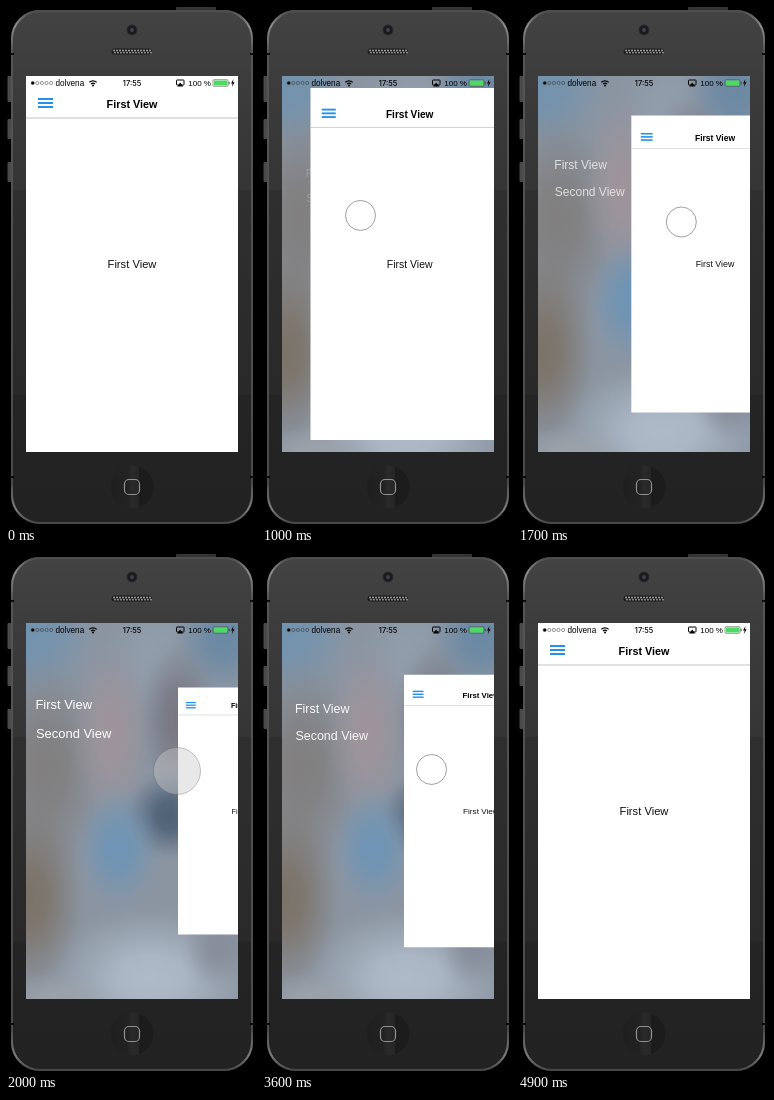
These frames come from a looping animation (250x519 px, 5000 ms). An HTML page with a canvas:

```html
<!DOCTYPE html>
<html>
<head>
<meta charset="utf-8">
<style>
html, body { margin: 0; width: 100%; height: 100%; overflow: hidden; background: #000; }
canvas { display: block; }
</style>
</head>
<body>
<canvas id="stage" width="250" height="519"></canvas>
<script>
const ctx = document.getElementById('stage').getContext('2d');
const LOOP = 5000, STEP = 100;
const SCREEN = { x: 20, y: 70, w: 212, h: 376, cx: 126, cy: 258 };
const OPEN = 156;
const FONT = '"Liberation Sans", Arial, sans-serif';

// [time, value] pairs, joined by straight lines
const panelPath = [[600, 0], [700, 3.5], [900, 19], [1300, 57], [1500, 78], [1800, 101],
  [1900, 134], [2000, 152], [2100, OPEN], [3200, OPEN], [3400, 141.5], [4000, 83],
  [4100, 70], [4200, 38], [4300, 15], [4400, 4], [4500, 0]];
const touches = [
  { down: 400, up: 1800, offset: 70, y: [[600, 206], [1300, 212], [1900, 218]] },
  { down: 2900, up: 4100, offset: 47.5, y: [[3100, 209], [3200, 210], [4000, 223], [4100, 225]] }
];
// Blurred wallpaper: x, y, horizontal radius, vertical radius, colour
const blobs = [
  [25, 80, 70, 70, '112,146,174'], [150, 105, 55, 70, '146,158,172'],
  [218, 85, 55, 60, '104,136,164'], [40, 215, 65, 120, '128,125,124'],
  [105, 180, 45, 95, '160,148,154'], [172, 165, 42, 85, '118,117,127'],
  [165, 262, 50, 48, '72,92,114'], [215, 250, 55, 80, '110,120,135'],
  [112, 295, 45, 65, '108,148,182'], [24, 345, 60, 105, '122,112,100'],
  [145, 425, 110, 75, '178,190,204'], [212, 395, 38, 45, '134,140,154'],
  [50, 450, 60, 35, '158,163,170']
];

function along(points, t) {
  if (t <= points[0][0]) return points[0][1];
  for (let i = 1; i < points.length; i++) {
    const [t0, v0] = points[i - 1], [t1, v1] = points[i];
    if (t < t1) return v0 + (v1 - v0) * (t - t0) / (t1 - t0);
  }
  return points[points.length - 1][1];
}

function gradient(x0, y0, x1, y1, stops) {
  const fill = ctx.createLinearGradient(x0, y0, x1, y1);
  stops.forEach(stop => fill.addColorStop(...stop));
  return fill;
}

function rect(x, y, w, h, fill, radius = 0) {
  ctx.fillStyle = fill;
  ctx.beginPath();
  ctx.roundRect(x, y, w, h, radius);
  ctx.fill();
}

function outline(x, y, w, h, radius, stroke, width = 1) {
  ctx.strokeStyle = stroke;
  ctx.lineWidth = width;
  ctx.beginPath();
  ctx.roundRect(x, y, w, h, radius);
  ctx.stroke();
}

function disc(x, y, r, fill, stroke, width = 1) {
  ctx.beginPath();
  ctx.arc(x, y, r, 0, 7);
  if (fill) { ctx.fillStyle = fill; ctx.fill(); }
  if (stroke) { ctx.strokeStyle = stroke; ctx.lineWidth = width; ctx.stroke(); }
}

function text(string, x, y, size, fill, align = 'left', weight = 'normal', font = FONT) {
  ctx.font = `${weight} ${size}px ${font}`;
  ctx.textAlign = align;
  ctx.fillStyle = fill;
  ctx.fillText(string, x, y);
}

function polygon(points, fill) {
  ctx.fillStyle = fill;
  ctx.beginPath();
  points.forEach(([x, y]) => ctx.lineTo(x, y));
  ctx.fill();
}

function scaled(x, y, scale, draw) {
  ctx.save();
  ctx.translate(x, y);
  ctx.scale(scale, scale);
  draw();
  ctx.restore();
}

function drawPhone() {
  rect(0, 0, 250, 519, '#000');
  rect(170, 1, 40, 5, '#353535', 1);
  [[70, 26], [113, 20], [156, 20]].forEach(([y, h]) => rect(1.5, y, 4, h, '#4a4a4a', 1));
  const shell = gradient(0, 4, 0, 517, [[0, '#434343'], [.13, '#3c3c3c'], [.35, '#353535'],
    [.351, '#2f2f2f'], [.75, '#292929'], [.751, '#242424'], [1, '#222']]);
  const rim = gradient(0, 4, 0, 518, [[0, '#4a4a4a'], [.03, '#8c8c8c'], [.08, '#555'],
    [.92, '#4a4a4a'], [.97, '#808080'], [1, '#444']]);
  rect(5, 4, 242, 514, shell, 29);
  outline(6, 5, 240, 512, 28, rim, 2);
  [47, 470].forEach(y => [5, 244].forEach(x => rect(x, y, 3, 2, '#0c0c0c')));
  disc(126, 24, 5, '#1b1b1b', '#2b2b2b');
  disc(126, 24, 2, '#3b4350');
  rect(105.5, 42.5, 40.5, 6, '#1c1c1c', 3);
  for (let x = 108; x < 145; x += 3) {
    disc(x, 44.5, .9, '#b0b0b0');
    disc(x + 1, 46.7, .9, '#a0a0a0');
  }
  disc(126, 481, 21.5, gradient(104, 0, 148, 0,
    [[0, '#1f1f1f'], [.4, '#222'], [.5, '#2a2a2a'], [.65, '#262626'], [.66, '#1c1c1c'], [1, '#1c1c1c']]));
  outline(118.5, 473.5, 15, 15, 4.5, '#909090', 1.2);
}

function drawWallpaper() {
  rect(SCREEN.x, SCREEN.y, SCREEN.w, SCREEN.h, '#8b95a2');
  for (const [x, y, rx, ry, rgb] of blobs) {
    ctx.save();
    ctx.translate(x, y);
    ctx.scale(rx, ry);
    const glow = ctx.createRadialGradient(0, 0, 0, 0, 0, 1);
    [[0, .92], [.3, .8], [.6, .4], [.85, .08], [1, 0]]
      .forEach(([at, alpha]) => glow.addColorStop(at, `rgba(${rgb},${alpha})`));
    disc(0, 0, 1, glow);
    ctx.restore();
  }
}

function drawMenu(shift) {
  ctx.globalAlpha = Math.min(1, shift / 130);
  scaled(SCREEN.cx, SCREEN.cy, 1 - (OPEN - shift) * .0012, () => {
    text('First View', -97, -102.5, 13, '#fff');
    text('Second View', -96.5, -73.5, 13, '#fff');
  });
  ctx.globalAlpha = 1;
}

function drawPanel(shift) {
  scaled(SCREEN.x + shift, SCREEN.cy, 1 - shift * .002255, () => {
    rect(0, -188, SCREEN.w, SCREEN.h, '#fff');
    rect(0, -146.4, SCREEN.w, .8, '#c4c4c4');
    [-166, -162, -158].forEach(y => rect(12, y, 15, 2, '#2490ea'));
    text('First View', 106, -156, 10.8, '#000', 'center', 'bold');
    text('First View', 106, 4, 11.2, '#111', 'center');
  });
}

function drawStatus() {
  for (let i = 0; i < 5; i++) disc(26.7 + 4.6 * i, 77, 1.6, i ? null : '#000', '#333', .5);
  text('dolvena', 49.5, 80, 8.2, '#000');
  [2.8, 5.2].forEach(r => {
    ctx.strokeStyle = '#000';
    ctx.lineWidth = 1.2;
    ctx.beginPath();
    ctx.arc(87, 80, r, -2.35, -.79);
    ctx.stroke();
  });
  disc(87, 79.6, 1, '#000');
  text('17:55', 126, 80, 7.5, '#000', 'center', '500', 'Inter, sans-serif');
  outline(170.5, 74, 7.5, 5, .5, '#000');
  polygon([[174.2, 76.5], [177.2, 80.5], [171.2, 80.5]], '#000');
  text('100 %', 182.3, 80, 8, '#000');
  outline(207, 73.7, 15, 6.6, 1, '#555', .6);
  rect(208, 74.4, 13.2, 5.2, '#4cd964', .5);
  rect(222.6, 75.8, 1, 2.4, '#444');
  polygon([[227.5, 73], [225, 77.5], [226.6, 77.5], [226, 81], [228.6, 76.2], [227, 76.2]], '#000');
}

function drawTouch({ down, up, offset, y }, t) {
  if (t < down || t >= up + 300) return;
  // Wide and grey just after contact and after release, a thin ring in between
  const spread = Math.max(0, 1 - (t - down) / 200, (t - up) / 200);
  const x = along(panelPath, Math.min(t, up)) + offset;
  disc(x, along(y, t), 15 + 8.5 * spread,
    `rgba(200,200,200,${.42 * spread})`, `rgba(95,95,95,${.85 - .35 * spread})`, .7);
}

function frame(now) {
  const t = Math.floor(now % LOOP / STEP) * STEP;
  const shift = along(panelPath, t);
  drawPhone();
  ctx.save();
  ctx.beginPath();
  ctx.rect(SCREEN.x, SCREEN.y, SCREEN.w, SCREEN.h);
  ctx.clip();
  drawWallpaper();
  drawMenu(shift);
  drawPanel(shift);
  drawStatus();
  touches.forEach(touch => drawTouch(touch, t));
  ctx.restore();
  requestAnimationFrame(frame);
}
requestAnimationFrame(frame);
</script>
</body>
</html>
```
